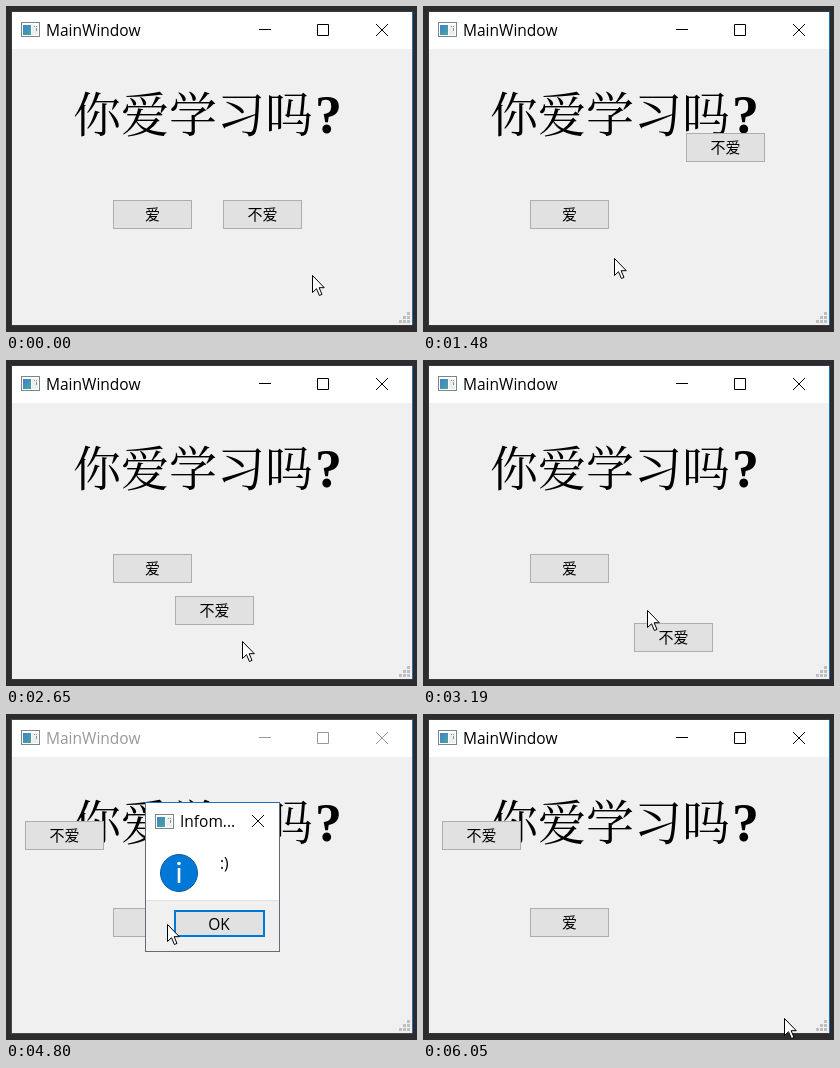
An HTML page that plays this animation: 411x326 px, repeating every 6100 ms.

```html
<!DOCTYPE html>
<html lang="zh-CN">
<head>
<meta charset="utf-8">
<title>MainWindow</title>
<style>
  html, body { margin: 0; width: 100%; height: 100%; overflow: hidden; background: #2d2b2e; }
  svg { display: block; }
  text { font: 15.5px "Open Sans", "Noto Sans", sans-serif; }
  .heading { font: 48px "Noto Serif CJK SC", "Noto Sans CJK SC", "Noto Sans CJK", sans-serif; }
  .mark { font: bold 54px "Liberation Serif", serif; }
  .label { font: 15px "Noto Sans CJK SC", "Noto Sans CJK", sans-serif; text-anchor: middle; }
  .face { fill: #e1e1e1; stroke: #adadad; }
  .hover { fill: #e5f1fb; stroke: #0078d7; }
  .press { fill: #cce4f7; stroke: #005499; }
  .line { fill: none; stroke: currentColor; }
  #bar { color: #000; }
  #bar.inactive { color: #999; }
  #dialog { transform-origin: 206px 163px; }
</style>
</head>
<body>
<svg width="411" height="326" viewBox="0 0 411 326">
  <defs>
    <linearGradient id="pane" x2="1" y2="1">
      <stop stop-color="#3f83c9"/><stop offset="1" stop-color="#4aa3a5"/>
    </linearGradient>
    <g id="icon">
      <rect x=".5" y=".5" width="18" height="14" fill="#fff" stroke="#7b868c"/>
      <rect x="2" y="3" width="8" height="10" fill="url(#pane)"/>
      <rect x="11" y="3" width="6" height="10" fill="#eceff0"/>
      <path d="M13 4.5h1M15 4.5h1M15.5 6v3" stroke="#8b969c"/>
    </g>
    <rect id="box" x=".5" y=".5" width="78" height="28"/>
    <clipPath id="central"><rect x="6" y="43" width="400" height="251"/></clipPath>
  </defs>

  <rect id="frame" x="5" y="5" width="402" height="315" fill="#39393b"/>
  <rect x="6" y="6" width="400" height="313" fill="#f0f0f0"/>
  <path d="M406.5 6V319" stroke="#1b70b8"/>
  <rect x="6" y="6" width="400" height="37" fill="#fff"/>
  <use href="#icon" x="15" y="16"/>
  <g id="bar">
    <text x="40" y="30" fill="currentColor">MainWindow</text>
    <path class="line" d="M253 23.5h12M311.5 18.5h11v11h-11zM370 18l12 12M382 18l-12 12"/>
  </g>
  <g fill="none" stroke="#bfbfbf" stroke-width="3" stroke-dasharray="3 1">
    <path d="M401 307.5h3"/><path d="M397 311.5h7"/><path d="M393 315.5h11"/>
  </g>

  <text class="heading" x="67" y="126">你爱学习吗</text>
  <text class="mark" x="309" y="127">?</text>

  <g transform="translate(107 194)">
    <use href="#box" class="face"/>
    <use href="#box" class="hover" id="yesHover"/>
    <use href="#box" class="press" id="yesPress"/>
    <text class="label" x="39.5" y="20">爱</text>
  </g>
  <g clip-path="url(#central)">
    <g id="no">
      <use href="#box" class="face"/>
      <text class="label" x="39.5" y="20">不爱</text>
    </g>
  </g>

  <g id="dialog">
    <rect x="139.5" y="88.5" width="134" height="149" fill="#fff" stroke="#656b72"/>
    <path d="M139 88.5h135" stroke="#1a74bd"/>
    <rect x="140" y="186" width="133" height="51" fill="#f0f0f0"/>
    <path d="M140 186.5h133" stroke="#dfdfdf"/>
    <use href="#icon" x="149" y="100"/>
    <text x="174" y="113">Infom...</text>
    <path class="line" d="M246 101l12 12M258 101l-12 12"/>
    <circle cx="173" cy="159" r="18.5" fill="#0078d7" stroke="#0a5a9e"/>
    <path d="M173 154v15" stroke="#fff" stroke-width="2.6"/>
    <circle cx="173" cy="149.5" r="1.8" fill="#fff"/>
    <text x="214" y="155">:)</text>
    <rect x="169" y="197" width="89" height="25" fill="#e1e1e1" stroke="#0078d7" stroke-width="2"/>
    <rect id="okHover" x="169" y="197" width="89" height="25" fill="#e5f1fb"/>
    <rect class="press" id="okPress" x="168.5" y="196.5" width="90" height="26"/>
    <text x="213" y="216" text-anchor="middle">OK</text>
  </g>

  <path id="cursor" d="M.5 .5V17.5L4.5 13.7L7.4 20.5L10 19.4L7.1 12.7H12.3Z" fill="#fff" stroke="#000"/>
</svg>
<script>
const LOOP = 6100;
const $ = id => document.getElementById(id);

// Pointer moves: start, end, steps, x, y
const home = [306, 269];
const moves = [
  [80, 510, 10, 253, 212],
  [790, 1300, 12, 189, 255],
  [1480, 1990, 11, 279, 140],
  [2170, 2680, 12, 235, 284],
  [2860, 3190, 8, 224, 250],
  [3420, 3550, 4, 235, 276],
  [3930, 4340, 10, 167, 220],
  [4390, 4520, 4, 161, 210],
  [4850, 5180, 7, 190, 211],
  [5230, 5310, 2, 195, 212],
  [5820, 6050, 6, 361, 304]
];

// Where the shy button stands from each time on
const spots = [
  [0, 217, 194], [390, 133, 238], [1110, 263, 127], [1860, 203, 276],
  [2600, 169, 236], [3030, 211, 263], [3480, 19, 107]
];

const ramp = (t, a, b) => Math.min(1, Math.max(0, (t - a) / (b - a)));
const ease = p => p * p * (3 - 2 * p);
const place = (el, [x, y]) => el.setAttribute("transform", `translate(${x} ${y})`);
const fade = (id, value) => $(id).setAttribute("opacity", value);

function pointer(t) {
  let at = home;
  for (const [start, end, steps, ...to] of moves) {
    if (t < start) break;
    const step = Math.floor(ramp(t, start, end) * (steps - 1) + 1e-6) + 1;
    const k = ease(step / steps);
    at = at.map((v, i) => Math.round(v + (to[i] - v) * k));
  }
  return at;
}

function draw(t) {
  place($("cursor"), pointer(t));
  place($("no"), spots.filter(spot => spot[0] <= t).pop().slice(1));

  const opened = t >= 4640 && t < 5850;
  fade("yesHover", t < 4640 ? ramp(t, 4320, 4520) : 0);
  fade("yesPress", t >= 4550 && t < 4640 ? 1 : 0);
  fade("okHover", ramp(t, 5230, 5430));
  fade("okPress", t >= 5770 && t < 5850 ? 1 : 0);

  const shown = ramp(t, 4620, 4780) * (1 - ramp(t, 5850, 5950));
  fade("dialog", shown);
  $("dialog").style.transform = `scale(${.9 + .1 * shown})`;
  $("bar").classList.toggle("inactive", opened);
  $("frame").setAttribute("fill", opened ? "#4a4a4c" : "#39393b");
}

const begin = performance.now();
function tick() {
  draw((performance.now() - begin) % LOOP);
  requestAnimationFrame(tick);
}
tick();
</script>
</body>
</html>
```
